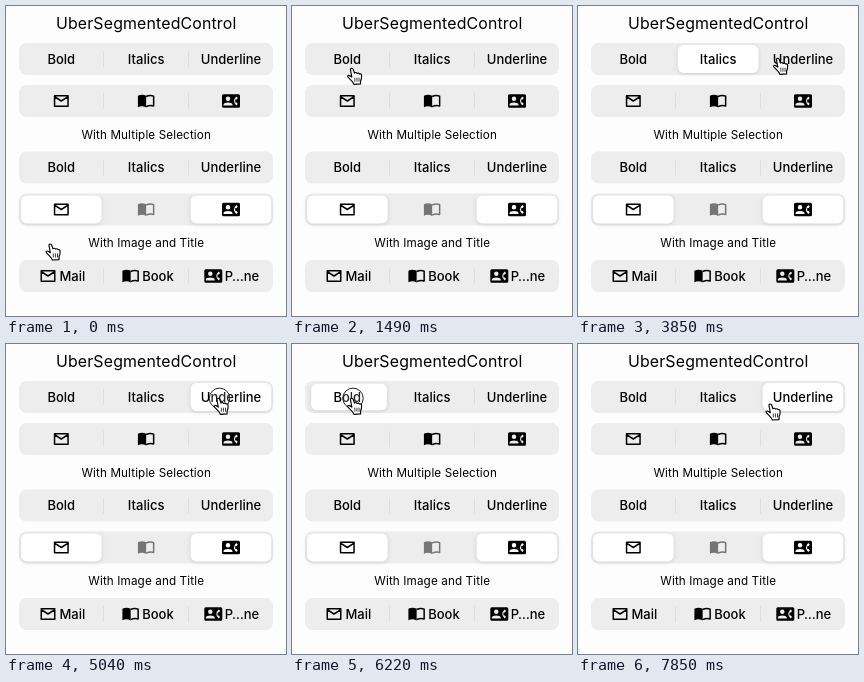
An HTML page that plays this animation: 280x310 px, repeating every 8 s.

```html
<!DOCTYPE html>
<html lang="en">
<head>
<meta charset="utf-8">
<title>Segmented control demo</title>
<style>
  html, body { margin: 0; width: 100%; height: 100%; overflow: hidden; background: #fdfdfd; }
  svg { display: block; width: 100%; height: 100%; }
  text { font-family: Inter, Roboto, sans-serif; fill: #000; }
  .mid { text-anchor: middle; }
  .title { font-size: 15.9px; letter-spacing: .15px; }
  .note { font-size: 11.7px; letter-spacing: .12px; }
  .label { font-size: 13px; font-weight: 500; }
  .bar { fill: #ededee; }
  .split { fill: #dededf; }
  .pill { fill: #fff; filter: drop-shadow(0 1.5px 2px rgba(0, 0, 0, .13)); }
  .line { fill: none; stroke: #000; stroke-width: 2; stroke-linejoin: round; }
</style>
</head>
<body>
<svg viewBox="0 0 280 310">
  <defs>
    <g id="mail" transform="scale(.75) translate(-12 -12)">
      <path class="line" d="M3 5H21V19H3ZM3.5 6.5L12 12L20.5 6.5"/>
    </g>
    <g id="book" transform="scale(.75) translate(-12 -13)">
      <path d="M1 6Q6.5 3 12 6V21.5Q6.5 18.5 1 21.2Z"/>
      <path class="line" d="M12 7Q17 4.4 22 6.5V19.6Q17 18 12 20.5"/>
    </g>
    <g id="contact" transform="scale(.75) translate(-12 -12)">
      <path fill-rule="evenodd" d="M2 3H22Q24 3 24 5V19Q24 21 22 21H2Q0 21 0 19V5Q0 3 2 3ZM5 9a3 3 0 1 0 6 0a3 3 0 1 0-6 0ZM2 18V17C2 13 14 13 14 17V18ZM19 6Q13 12 19 18L21 16L19.5 14H17.8Q17.2 12 17.8 10H19.5L21 8Z"/>
    </g>
  </defs>
  <text class="mid title" x="140.2" y="22.6">UberSegmentedControl</text>
  <text class="mid note" x="140.2" y="132.7">With Multiple Selection</text>
  <text class="mid note" x="140.2" y="241.3">With Image and Title</text>
  <g id="controls"></g>
  <circle id="ring" r="10.2" fill="#fff" fill-opacity=".15" stroke="#222"/>
  <g id="hand" stroke="#000" stroke-linecap="round" stroke-linejoin="round">
    <path fill="#fff" stroke-width="1.2" d="M-1.7 1Q-.5-1 1.2 1L2.6 5Q4.5 3.7 5.3 5.4Q7 4.4 7.9 6Q9.8 5.5 10.1 7.3Q10.4 11 9 13.3V16.4L2 16.9Q1.2 14.5-2.4 11.2Q-5.5 8.5-4.4 7.7Q-3.2 6.7-.2 9.2Z"/>
    <path fill="none" stroke-width=".8" d="M3 10.3v3.4M5.2 10.3v3.4M7.4 10.3v3.4"/>
  </g>
</svg>
<script>
const LOOP = 8000, TICKS = 54;
const icons = ['mail', 'book', 'contact'];
const words = ['Bold', 'Italics', 'Underline'];
const centerX = i => 55.3 + 84.85 * i;
const $ = id => document.getElementById(id);
const root = $('controls');

function add(parent, tag, attrs, text) {
  const el = document.createElementNS('http://www.w3.org/2000/svg', tag);
  for (const key in attrs) el.setAttribute(key, attrs[key]);
  if (text) el.textContent = text;
  parent.appendChild(el);
  return el;
}

const move = (el, x, y, scale = 1) =>
  el.setAttribute('transform', `translate(${x} ${y}) scale(${scale})`);
const fade = (el, opacity) => el.setAttribute('opacity', opacity);

const addPill = parent =>
  add(parent, 'rect', { class: 'pill', x: -40.3, y: -14, width: 80.6, height: 28, rx: 6 });
const addWord = (g, x, i) =>
  add(g, 'text', { class: 'mid label', x, y: 4.5 }, words[i]);

function addIcon(g, x, i) {
  const holder = add(g, 'g', {});
  add(holder, 'use', { href: '#' + icons[i] });
  move(holder, x, 0);
  return holder;
}

function addControl(y, fill) {
  const group = add(root, 'g', {});
  move(group, 0, y);
  add(group, 'rect', { class: 'bar', x: 13, y: -16, width: 254, height: 32, rx: 7.5 });
  const splits = [97, 182].map(x =>
    add(group, 'rect', { class: 'split', x, y: -8, width: 1, height: 16 }));
  const pills = add(group, 'g', {});
  words.forEach((_, i) => fill(group, centerX(i), i));
  return { splits, pills };
}

const single = addControl(53, addWord);
const pill = addPill(single.pills);
addControl(95, addIcon);
addControl(161.5, addWord);

const multi = addControl(203.5, (g, x, i) => fade(addIcon(g, x, i), i === 1 ? .5 : 1));
multi.splits.forEach(s => fade(s, 0));
[0, 2].forEach(i => move(addPill(multi.pills), centerX(i), 0));

addControl(270, (g, x, i) => {
  const left = x - 13.3 - 2.2 * i;
  addIcon(g, left, i);
  add(g, 'text', { class: 'label', x: left + 11.5, y: 4.5 }, ['Mail', 'Book', 'P…ne'][i]);
});

const home = { x: 44.5, y: 238 };
const moves = [
  { from: 0, to: 2, x: 71.5, y: 212 },
  { from: 4, to: 10, x: 60, y: 62.3 },
  { from: 17, to: 20, x: 116, y: 61 },
  { from: 20, to: 24, x: 140, y: 55 },
  { from: 25, to: 26, x: 200, y: 52.3 },
  { from: 26, to: 30, x: 212.5, y: 54.3 },
  { from: 34, to: 42, x: 60, y: 54.3 },
  { from: 44, to: 47, x: 212.5, y: 55 },
  { from: 50, to: 53, x: 192.5, y: 60 }
];

const taps = [
  { down: 12, pick: 15, seg: 0 },
  { down: 21, pick: 22, seg: 1 },
  { down: 30, pick: 31, seg: 2 },
  { down: 41, pick: 42, seg: 0 },
  { down: 47, pick: 47, seg: 2 }
];
const HOLD = 3;

function tipAt(k) {
  let { x, y } = home;
  for (const m of moves) {
    const u = Math.min(1, Math.max(0, (k - m.from) / (m.to - m.from)));
    const eased = u * u * (3 - 2 * u);
    x += (m.x - x) * eased;
    y += (m.y - y) * eased;
  }
  return { x, y };
}

function ringAt(k) {
  const tap = taps.find(t => k >= t.down && k <= t.pick + HOLD);
  if (!tap) return 0;
  return k === tap.down && tap.down < tap.pick ? .5 : 1;
}

// A picked pill arrives small, settles sideways, then grows on release
function drawPill(k) {
  const n = taps.filter(t => t.pick <= k).length - 1;
  const seg = n < 0 ? -1 : taps[n].seg;
  fade(pill, n < 0 ? 0 : 1);
  single.splits.forEach((s, i) => fade(s, seg === i || seg === i + 1 ? 0 : 1));
  if (n < 0) return;
  const age = k - taps[n].pick;
  const last = n ? taps[n - 1].seg : seg;
  const lag = age ? 0 : 1.7 * Math.sign(last - seg);
  move(pill, centerX(seg) + lag, 0, age < HOLD ? .94 : 1);
}

function draw(ms) {
  const k = Math.min(TICKS - 1, Math.floor((ms % LOOP + 8) * TICKS / LOOP));
  const { x, y } = tipAt(k);
  move($('hand'), x, y, .95);
  move($('ring'), x + 1, y);
  fade($('ring'), ringAt(k));
  drawPill(k);
}

const start = performance.now();
function frame() {
  draw(performance.now() - start);
  requestAnimationFrame(frame);
}
draw(0);
requestAnimationFrame(frame);
</script>
</body>
</html>
```
